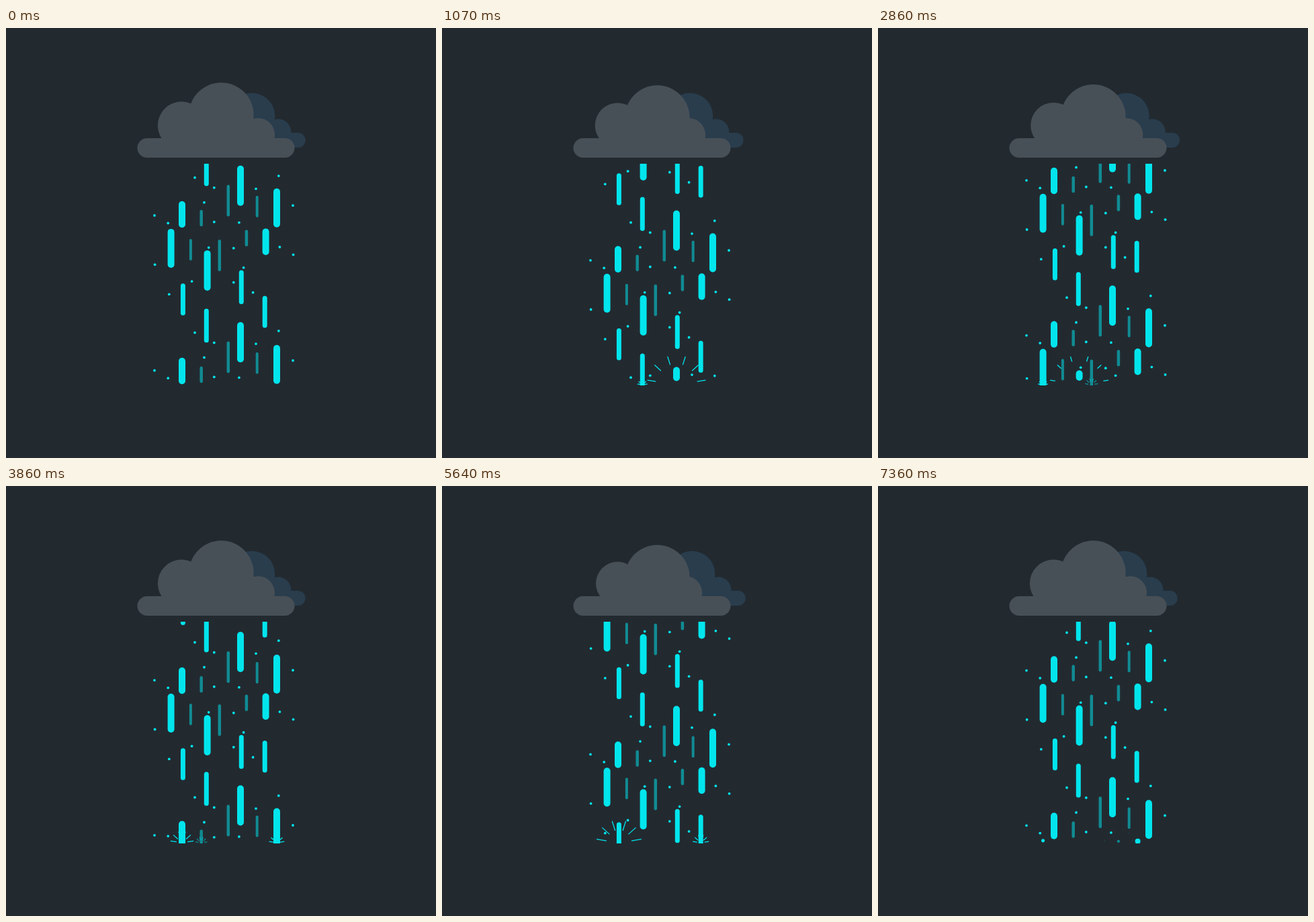
Write an HTML page with a canvas that moves like this. It is 640x640 px and loops after 7430 ms.

```html
<!DOCTYPE html>
<html lang="en">
<head>
<meta charset="utf-8">
<title>Rain cloud</title>
<style>
  html, body { margin: 0; width: 100%; height: 100%; overflow: hidden; background: #222a30; }
  canvas { display: block; width: 640px; height: 640px; }
</style>
</head>
<body>
<canvas id="stage"></canvas>
<script>
const SIZE = 640, LOOP = 7430, STEPS = 104, TAU = Math.PI * 2;
const SKY = '#222a30', CYAN = '#02e5ed', GREY = '#485057', BLUE = '#293d4d';
const TOP = 202, GROUND = 532, DOT_FLOOR = 526.4, DOT_LIFE = 18.5;
const TRAVEL = 461.5, HALF = TRAVEL / 2, START = 118;
const RAY_REACH = 44, RAY_LIFE = 48;
const RAY_ANGLES = [9, 42, 72.5].map(a => a * Math.PI / 180);

// The rain has point symmetry: each part returns turned by half a circle.
const MIRROR_X = 648.6, DROP_SUM = 596.2, DOT_SUM = 617;

// x, y, width, length, gap to the following copy
const dropSeeds = [
  [330.8, 233.9, 4.5, 47],
  [373.7, 250, 4, 32],
  [290.7, 271, 4.5, 24.5],
  [349, 205, 10, 60],
  [403, 239, 10, 58],
  [262, 258, 10, 39.5],
  [298.3, 185, 7, 50.5],
  [385.2, 399, 7, 47.5, 201]
];
const dotSeeds = [
  [281, 223], [309.8, 238], [372, 239.6], [405.8, 220.4], [427, 264.5],
  [295, 260], [221, 279.3], [241.2, 290.7], [309.8, 289], [346.9, 289.9]
];

const drops = dropSeeds.flatMap(([x, y, w, len, gap = 233]) => [
  { x, y, w, len, gap },
  { x: MIRROR_X - x, y: DROP_SUM - y - len, w, len, gap: HALF }
]);
const dots = dotSeeds.flatMap(([x, y]) => [
  { x, y, gap: HALF },
  { x: MIRROR_X - x, y: DOT_SUM - y, gap: HALF }
]);

const canvas = document.getElementById('stage');
const ctx = canvas.getContext('2d');
const ratio = window.devicePixelRatio || 1;
canvas.width = canvas.height = SIZE * ratio;
ctx.scale(ratio, ratio);

const clamp = (v, lo, hi) => Math.min(hi, Math.max(lo, v));
const wrap = y => START + (((y - START) % TRAVEL) + TRAVEL) % TRAVEL;

function disc(x, y, r) {
  ctx.beginPath();
  ctx.arc(x, y, r, 0, TAU);
  ctx.fill();
}

function pill(x, y, w, h) {
  ctx.beginPath();
  ctx.roundRect(x, y, w, h, Math.min(w, h) / 2);
  ctx.fill();
}

// A drop is cut flat by the ground, then gathers into a shrinking bead.
function drawDrop({ x, w, len }, y, sunk) {
  if (sunk > 0.91) return;
  let bottom = y + len;
  if (sunk > 0.35) {
    w *= Math.min(1, (1 - sunk) / 0.23);
    bottom = 535 - 10 * clamp((sunk - 0.35) / 0.2, 0, 1);
    bottom = Math.max(bottom, y + w);
  }
  pill(x - w / 2, y, w, bottom - y);
}

function drawSplash(x, age, scale) {
  if (age <= 0 || age > RAY_LIFE) return;
  const grow = Math.min(age / 32, 1);
  const outer = RAY_REACH * (1 - Math.pow(1 - grow, 1.4)) * scale;
  const inner = Math.min(RAY_REACH * Math.pow(age / RAY_LIFE, 1.08) * 1.06, RAY_REACH - 0.7) * scale;
  if (outer <= inner) return;
  ctx.lineWidth = 1.3;
  ctx.beginPath();
  for (const a of RAY_ANGLES) {
    for (const side of [-1, 1]) {
      const dx = Math.cos(a) * side, dy = -Math.sin(a);
      ctx.moveTo(x + dx * inner, 531 + dy * inner);
      ctx.lineTo(x + dx * outer, 531 + dy * outer);
    }
  }
  ctx.stroke();
}

function eachCopy(list, fall, paint) {
  for (const item of list) {
    for (const shift of [0, item.gap]) paint(item, wrap(item.y + shift + fall));
  }
}

function paintDrop(drop, y) {
  const far = drop.w < 5;
  const sunk = (y + drop.len - GROUND) / drop.len;
  ctx.globalAlpha = far ? 0.52 : 1;
  drawDrop(drop, y, sunk);
  drawSplash(drop.x, sunk * 60 + 0.5, far ? 0.48 : 1);
}

// A dot bounces off the floor and fades out near the top of its hop.
function paintDot({ x }, y) {
  const u = y - DOT_FLOOR;
  if (u > DOT_LIFE) return;
  if (u > 0) y = DOT_FLOOR - 1.2 * u + 0.02 * u * u;
  disc(x, y, 1.9 * clamp((DOT_LIFE - u) / 2, 0, 1));
}

function drawCloud(phase) {
  const c = Math.cos(phase);
  const drift = 3.1 * (1 - Math.cos(phase - 0.25));

  ctx.fillStyle = BLUE;
  disc(366 + drift, 131, 34.2);
  disc(405 + drift, 154.8, 19.3);
  pill(370 + drift, 156, 75.5, 22);

  ctx.fillStyle = GREY;
  disc(261.3, 145, 33.9 + 1.6 * c);
  disc(320.4, 132.7 - 3.25 * c, 48.2);
  disc(369 + 6.5 * c, 158.8, 24.6);
  pill(195.5, 164, 234, 29);
}

function draw(turn) {
  ctx.fillStyle = SKY;
  ctx.fillRect(0, 0, SIZE, SIZE);

  ctx.save();
  ctx.beginPath();
  ctx.rect(0, TOP, SIZE, GROUND - TOP);
  ctx.clip();
  // The fall surges very slightly in mid loop.
  const fall = TRAVEL * turn + 0.3 - 0.6 * Math.cos(TAU * turn);
  ctx.fillStyle = ctx.strokeStyle = CYAN;
  eachCopy(drops, fall, paintDrop);
  ctx.globalAlpha = 1;
  eachCopy(dots, fall, paintDot);
  ctx.restore();

  drawCloud(turn * TAU * 2);
}

const first = performance.now();
function tick() {
  const time = (performance.now() - first) % LOOP;
  const step = Math.floor((time + 8) / LOOP * STEPS) % STEPS;
  draw(step / STEPS);
  requestAnimationFrame(tick);
}
tick();
</script>
</body>
</html>
```
